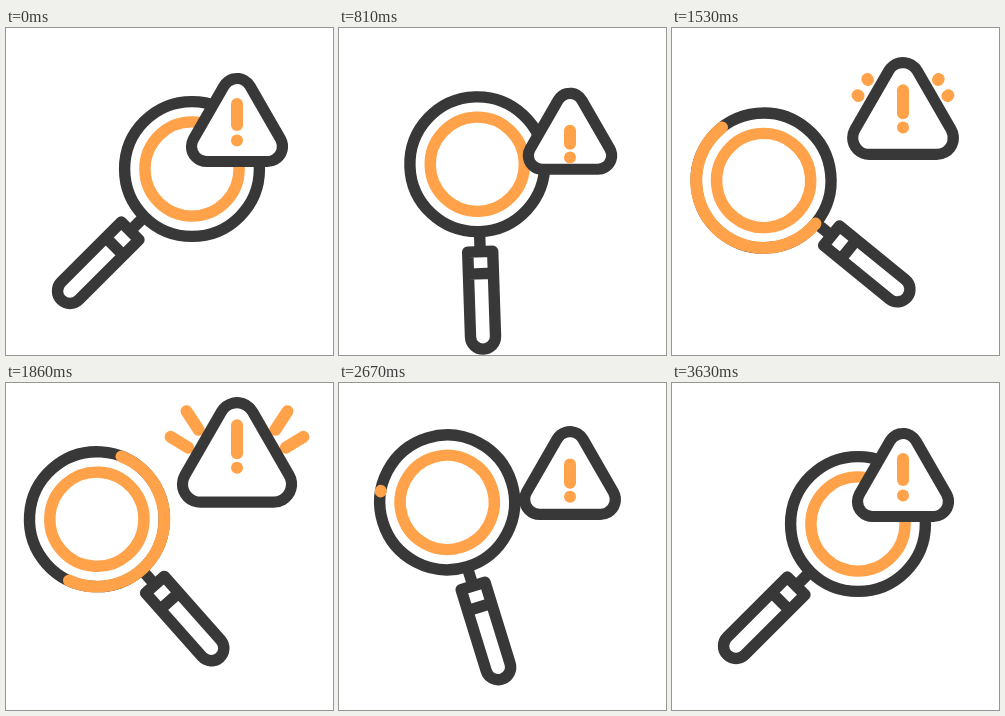
An HTML page for the animation above (4.5 s loop, 327 by 327 pixels).

```html
<!DOCTYPE html>
<html lang="en">
<head>
<meta charset="utf-8">
<title>Search alert</title>
<style>
  html, body { margin: 0; width: 100%; height: 100%; overflow: hidden; background: #fff; }
  svg { display: block; width: 100%; height: 100%; }
  .line { fill: none; stroke: #383838; stroke-width: 11.4; stroke-linejoin: round; }
  .glow { fill: none; stroke: #ffa249; stroke-width: 12; stroke-linecap: round; }
  #inner { stroke-width: 11.4; }
  #edge { fill: #383838; stroke: #383838; stroke-linejoin: round; }
  #face { fill: #fff; stroke: #fff; stroke-linejoin: round; }
</style>
</head>
<body>
<svg viewBox="0 0 327 327">
  <g id="glass">
    <path class="line" d="M0 67V88"/>
    <path class="line" d="M-12.5 87.5H12.5V172.5A12.5 12.5 0 0 1 -12.5 172.5ZM-12.5 109.5H12.5"/>
    <circle class="line" r="67.4"/>
    <circle class="glow" id="inner" r="47.1"/>
    <path class="glow" id="sweep"/>
  </g>
  <path class="glow" id="sparks"/>
  <path id="edge"/>
  <path id="face"/>
  <path class="glow" id="bar"/>
  <circle id="dot" cx="231" r="6" fill="#ffa249"/>
</svg>
<script>
const LOOP = 4500;
const el = id => document.getElementById(id);
const clamp = x => Math.min(1, Math.max(0, x));
const part = (t, a, b) => clamp((t - a) / (b - a));
const smooth = x => x * x * (3 - 2 * x);
const mix = (a, b, f) => a + (b - a) * f;

// Eased interpolation between poses: [time, [values]]
function pose(keys, t) {
  let i = 0;
  while (i < keys.length - 2 && t >= keys[i + 1][0]) i++;
  const [t0, a] = keys[i], [t1, b] = keys[i + 1];
  const f = smooth(part(t, t0, t1));
  return { i, f, v: a.map((x, k) => mix(x, b[k], f)) };
}

// Smooth curve through [time, value] points, flat at both ends
function spline(p, t) {
  const n = p.length - 1;
  if (t <= p[0][0]) return p[0][1];
  if (t >= p[n][0]) return p[n][1];
  let i = 0;
  while (t >= p[i + 1][0]) i++;
  const slope = k => k === 0 || k === n ? 0
    : (p[k + 1][1] - p[k - 1][1]) / (p[k + 1][0] - p[k - 1][0]);
  const h = p[i + 1][0] - p[i][0], u = (t - p[i][0]) / h;
  return mix(p[i][1], p[i + 1][1], smooth(u))
    + h * u * (1 - u) * ((1 - u) * slope(i) - u * slope(i + 1));
}

// Lens centre x, y and handle angle
const home = [186, 141, 45];
const glassKeys = [[300, home], [1350, [92, 155.7, -52.7]], [2400, [92.8, 115.1, -29.5]], [3450, home]];
// Bend of each leg: x and y offsets as f(1-f)(a + bf)
const bends = [[-1.3, -18.8, -35.3, -25], [-6, 0, 0, 0], [0, 0, 0, 0]];

// Sign centre y, size, bar top, bar bottom, dot y
const rest = [92, 1, 76, 97, 112.5];
const low = [104, 0.91, 104.5, 117, 130.5];
const high = [69.3, 1.2, 42, 70, 84.6];
const dip = [102, 0.88, 104.5, 117, 130.5];
const signKeys = [[300, rest], [900, low], [930, low], [1900, high], [2270, high], [2950, dip], [3620, rest]];

const lead = [[960, 224], [1050, 207], [1530, 1], [2190, -221.5], [2350, -243.5]];
const trail = [[990, 224], [1050, 222], [1530, 193], [2190, -79.5], [2670, -243]];

// Start, control and end of the right-hand spark paths
const rays = [
  [[275.5, 68], [293.5, 53.5], [312.5, 48]],
  [[266, 52], [280, 29.7], [290.5, 15.5]]
];

function drawGlass(t) {
  const { i, f, v } = pose(glassKeys, t);
  const [ax, bx, ay, by] = bends[i], w = f * (1 - f);
  const x = v[0] + w * (ax + bx * f), y = v[1] + w * (ay + by * f);
  el("glass").setAttribute("transform", `translate(${x} ${y}) rotate(${v[2]})`);
}

function drawSweep(t) {
  let d = "";
  if (t >= 990 && t < 2700) {
    const a = spline(lead, t), b = Math.max(a + 0.3, spline(trail, t));
    const at = deg => {
      const r = (deg + 90) * Math.PI / 180;
      return `${67.4 * Math.cos(r)} ${67.4 * Math.sin(r)}`;
    };
    d = `M${at(a)}A67.4 67.4 0 ${b - a > 180 ? 1 : 0} 1 ${at(b)}`;
  }
  el("sweep").setAttribute("d", d);
}

function drawSparks(t) {
  let d = "";
  if (t >= 1500 && t < 2450) {
    const head = 1 - (1 - part(t, 1520, 2450)) ** 2;
    const tail = Math.min(head - 0.005, smooth(part(t, 1700, 2450)));
    for (const [s, c, e] of rays) {
      const at = u => [0, 1].map(k => mix(mix(s[k], c[k], u), mix(c[k], e[k], u), u));
      const [x0, y0] = at(tail), [x1, y1] = at(head);
      d += `M${x0} ${y0}L${x1} ${y1}M${462 - x0} ${y0}L${462 - x1} ${y1}`;
    }
  }
  el("sparks").setAttribute("d", d);
}

// Rounded triangle: a dark one with a smaller white one on top
function drawSign(t) {
  const [y, s, top, bottom, dot] = pose(signKeys, t).v;
  const dx = 30.5 * s, dy = 26.5 * s;
  const tri = `M231 ${y - dy}L${231 + dx} ${y + dy}H${231 - dx}Z`;
  [["edge", 5.6], ["face", -5.6]].forEach(([id, half]) => {
    el(id).setAttribute("d", tri);
    el(id).setAttribute("stroke-width", 2 * (15 * s + half));
  });
  el("bar").setAttribute("d", `M231 ${top}V${bottom}`);
  el("dot").setAttribute("cy", dot);
}

const start = performance.now();
function frame(now) {
  const t = Math.max(0, now - start) % LOOP;
  drawGlass(t);
  drawSweep(t);
  drawSparks(t);
  drawSign(t);
  requestAnimationFrame(frame);
}
frame(start);
</script>
</body>
</html>
```
